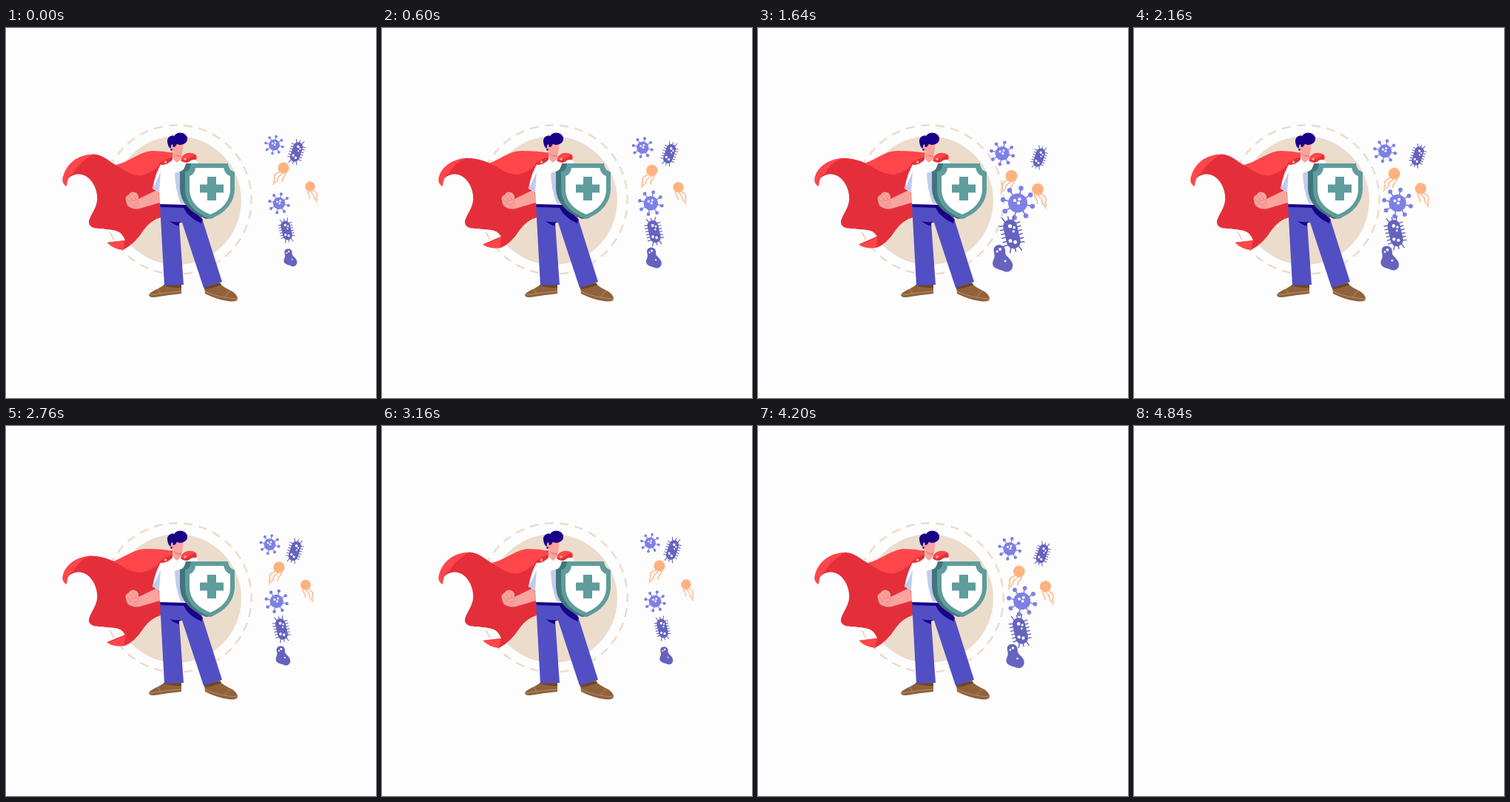
Write an HTML page that moves like this. It is 500 by 500 pixels and loops after 4.88 s.

```html
<!DOCTYPE html>
<html lang="en">
<head>
<meta charset="utf-8">
<title>Shield hero</title>
<style>
  html, body { margin: 0; width: 100%; height: 100%; overflow: hidden; background: #fdfdfd; }
  svg { display: block; width: 100%; height: 100%; }
  .red { fill: #e42f3b; } .bright { fill: #ff464b; } .skin { fill: #f9a49d; }
  .navy { fill: #190087; } .blue { fill: #514fc3; } .teal { fill: #5f9c9c; }
  .shoe { fill: #8f623c; } .shade { fill: #c3caf0; } .white { fill: #fff; }
  .sand { fill: #ecdccb; } .dot { fill: #ffb27f; }
  .line { fill: none; stroke-linecap: round; stroke-linejoin: round; }
</style>
</head>
<body>
<svg viewBox="0 0 500 500">
  <g id="scene">
    <circle class="sand" cx="231" cy="233" r="87"/>
    <circle cx="231" cy="232" r="100.7" fill="none" stroke="#ecdccb" stroke-width="2.5"
      pathLength="372" stroke-dasharray="7 5" transform="rotate(-96.4 231 232)"/>

    <path id="fold" class="bright"/>
    <path id="cape" class="red"/>
    <path id="hook" class="bright"/>
    <path id="tail" class="bright"/>

    <!-- shoes and trousers -->
    <path class="shoe" d="M214 347L237 347L237 359Q217 361 200 364Q193 364 193 361Q194 357 206 352Z"/>
    <path class="shoe" d="M268 349L289 345Q293 350 306 356Q313 361 313 366Q312 371 300 369Q285 367 269 359Z"/>
    <path d="M213 347H237V351Q225 352 213 348ZM268 349L289 344L291 347Q280 352 268 353Z" fill="#6f4527"/>
    <path class="line" d="M194 361Q216 357 236 356M205 353L209 359M269 356Q288 365 312 366M296 364Q298 358 303 356"
      stroke="#c49a6f" stroke-width=".8"/>
    <path class="blue" d="M208 238L257 240Q264 253 267 264L292 343L267 351L238 263L234 263L240 347L214 348Z"/>
    <path class="navy" d="M208 237L243 238L266 259L264 264Q247 257 240 243L209 242ZM221 261Q228 263 237 262L234 264L234 268Q227 266 221 261Z"/>

    <!-- arm -->
    <path class="skin" d="M206 218L179 231Q180 224 174 222Q169 220 166 225Q160 228 162 233Q163 241 169 243Q176 246 184 243L208 236Z"/>
    <path class="line" d="M166 226Q170 229 171 234M170 223Q175 228 175 231M163 232Q168 233 169 238M171 234Q177 230 179 233Q178 238 172 239M173 242Q179 241 180 237"
      stroke="#e9757a" stroke-width=".7"/>

    <!-- shirt -->
    <path class="white" d="M212 180L226 175L239 175L254 177Q260 179 261 187L247 239L208 238L207 222L198 217Q202 194 212 180Z"/>
    <path class="shade" d="M209 194Q208 208 207 222L198 217Q204 207 209 194ZM228 196L240 192L244 238L236 237Q229 220 228 196Z"/>

    <!-- head -->
    <path class="skin" d="M226 162L237 165L237 176Q233 181 231 182Q226 179 225 173Z"/>
    <path d="M227 170Q233 173 237 171L236 174Q230 175 227 170Z" fill="#ed7d82"/>
    <path class="skin" d="M223 153L239 152Q240 161 238 170Q236 173 232 171Q225 168 223 163Z"/>
    <ellipse class="navy" cx="235.500" cy="149.800" rx="9.600" ry="8.200"/>
    <path class="navy" d="M219 158Q215 147 226 145L231 155Q230 161 226 161L225 157Q222 158 223 163Q220 162 219 158Z"/>
    <circle class="navy" cx="223.5" cy="164.500" r="1.3"/>

    <!-- shoulder pads -->
    <path class="bright" d="M207 184Q209 171 225 168L225 177Q216 187 207 184Z"/>
    <path class="bright" d="M236 179Q237 171 245 169Q253 168 257 172Q259 177 256 178Q251 177 247 181Q241 183 236 179Z"/>
    <path class="red" d="M207 184Q213 177 225 174L225 178Q216 187 207 184ZM236 179Q247 178 256 171Q259 176 256 178Q251 177 247 181Q241 183 236 179Z"/>
    <circle class="dot" cx="215.500" cy="181" r="1.7"/>
    <circle class="dot" cx="242" cy="177" r="1.7"/>

    <!-- shield -->
    <path fill="#40767b" d="M243 183L264 183L280 257L270 258Q236 244 235 217L235 194Q241 193 243 183Z"/>
    <path class="teal" d="M250 183L300 183Q301 193 309 194.500L309 219Q307 246 276 258Q243 245 242 219L242 194.500Q249 193 250 183Z"/>
    <path class="white" d="M256 189L294 189Q296 198 303 200L303 219Q302 241 276 252Q249 241 248 219L248 200Q255 198 256 189Z"/>
    <path class="teal" d="M272 201H284V211.500H294V222.500H284V233H272V222.500H262V211.500H272Z"/>
  </g>
</svg>
<script>
const LOOP = 4880, BLANK = 4840, STEP = 40;
const DRIFT = 3200, WAVE = DRIFT / 3;
const $ = id => document.getElementById(id);
const scene = $('scene');

const polar = (r, a) => [r * Math.cos(a), r * Math.sin(a)].map(v => v.toFixed(2));
const circle = (x, y, r, fill = '#fff') => `<circle cx="${x}" cy="${y}" r="${r}" fill="${fill}"/>`;
const line = (d, color, w) => `<path class="line" d="${d}" stroke="${color}" stroke-width="${w}"/>`;

function virus() {
  const color = '#7e80e6';
  let d = '', art = circle(0, 0, 9.6, color);
  for (let i = 0; i < 8; i++) {
    const [x, y] = polar(15, (i + .28) * Math.PI / 4);
    d += `M0 0L${x} ${y}`;
    art += circle(x, y, 2.4, color);
  }
  return line(d, color, 1.3) + art +
    circle(-3, -2.5, 1.6) + circle(1.8, -4, 1.6) + circle(.8, 0, 1.6);
}

function bacterium() {
  const color = '#6663bf';
  let d = '';
  for (let y = -12; y <= 12; y += 4.8) d += `M-14 ${y * 1.15}L0 ${y}L14 ${y * 1.15}`;
  for (const x of [-5, 0, 5]) d += `M${x} -17L${x * 1.6} -24M${x} 17L${x * 1.6} 24`;
  return line(d, color, 1.6) +
    `<rect x="-9.500" y="-20" width="19" height="40" rx="9.500" fill="${color}"/>` +
    circle(0, -11, 2.6) + circle(5, -8, 1.8) + circle(3, -3, 1.6) +
    circle(-4, 8.5, 2.4) + circle(2, 11.5, 2.4);
}

const jelly = () => line(
  'M-4 4C-7 9 -12 6 -13 12C-14 16 -10 15 -14.500 20M-1 6C-2 12 -9 10 -8 16C-8 20 -13 19 -14.500 24M3 6C5 12 -3 13 -2 19',
  '#ffb27f', 1.4) + circle(0, 0, 8, '#ffb27f');

const blob = () =>
  '<path d="M-8 -17C-1 -20 5 -15 4 -8C4 -2 12 0 14 8C15 16 9 20 3 18C-3 15 -13 15 -13 7C-13 2 -9 0 -11 -7C-12 -11 -12 -15 -8 -17Z" fill="#6663bf"/>' +
  circle(-3, -12, 2) + circle(-7, -9, 1.5) + circle(4, 4, 1.4);

// art, far [x, y, scale], near [x, y, scale], tilt, mirror
const germs = [
  [virus, [362.5, 158, .78], [330, 169.5, 1], 0, 1],
  [bacterium, [392.5, 167.5, .68], [380, 175, .64], 18, 1],
  [jelly, [375, 189, .95], [342.5, 200, 1], 0, 1],
  [jelly, [411, 214, .84], [378, 218, 1], 8, -1],
  [virus, [369, 237, .86], [351, 236.5, 1.36], 0, 1],
  [bacterium, [379, 273.5, .66], [343, 278.5, 1], -13, 1],
  [blob, [384, 310, .66], [330, 311, 1], 0, 1]
].map(([art, far, near, tilt, flip]) => {
  const node = document.createElementNS('http://www.w3.org/2000/svg', 'g');
  node.innerHTML = art();
  scene.append(node);
  return { node, far, near, tilt, flip };
});

// eased swing 0 -> 1 -> 0 over one period
function swing(t, period) {
  const p = t % period / period * 2;
  const u = p < 1 ? p : 2 - p;
  return u * u * (3 - 2 * u);
}

function drawCape(k) {
  const mix = (a, b) => (a + (b - a) * k).toFixed(2);
  const peak = `${mix(118, 113)} ${mix(170.5, 176)}`;
  const crease = `${mix(148, 145)} ${mix(185, 182.5)}`;
  const tip = `${mix(136.5, 136)} ${mix(290, 292.5)}`;
  const edge = `161 ${mix(287, 281.5)}`;
  const low = `${mix(158, 160)} ${mix(300, 297)}`;
  $('fold').setAttribute('d',
    `M${crease}C${mix(165, 160)} ${mix(182, 177)} ${mix(180, 172)} ${mix(167, 166)} ${mix(198, 188)} 166` +
    `Q212 166 226 169L210 190L180 204Z`);
  $('cape').setAttribute('d',
    `M84 204Q88 184 ${peak}C${mix(131, 127)} ${mix(171, 175.5)} 139 180 ${crease}` +
    `C160 190 168 ${mix(201, 198)} 184 ${mix(199, 198)}Q199 195 208 184L212 255` +
    `Q196 259 186 273Q174 292 ${low}L${tip}L${edge}` +
    `C155 270 142 274 130 271C117 272 109 267 113 258` +
    `C117 248 125 239 123 226C121 207 104 188 84 203Z`);
  $('hook').setAttribute('d',
    `M82 214C76 211 75 205 78 198C83 ${mix(183, 186)} 97 ${mix(171, 177)} ${peak}` +
    `Q97 183 91 196Q83 200 82 214Z`);
  $('tail').setAttribute('d', `M${tip}Q150 ${mix(288, 290)} ${edge}L${low}Q145 299 ${tip}Z`);
}

function draw(t) {
  scene.style.visibility = t < BLANK ? 'visible' : 'hidden';
  const k = swing(t, DRIFT);
  for (const { node, far, near, tilt, flip } of germs) {
    const [x, y, s] = far.map((v, i) => v + (near[i] - v) * k);
    node.setAttribute('transform', `translate(${x} ${y}) rotate(${tilt}) scale(${s * flip} ${s})`);
  }
  drawCape(swing(t, WAVE));
}

function tick() {
  const t = performance.now() % LOOP;
  draw(Math.floor(t / STEP) * STEP);
  requestAnimationFrame(tick);
}
tick();
</script>
</body>
</html>
```
